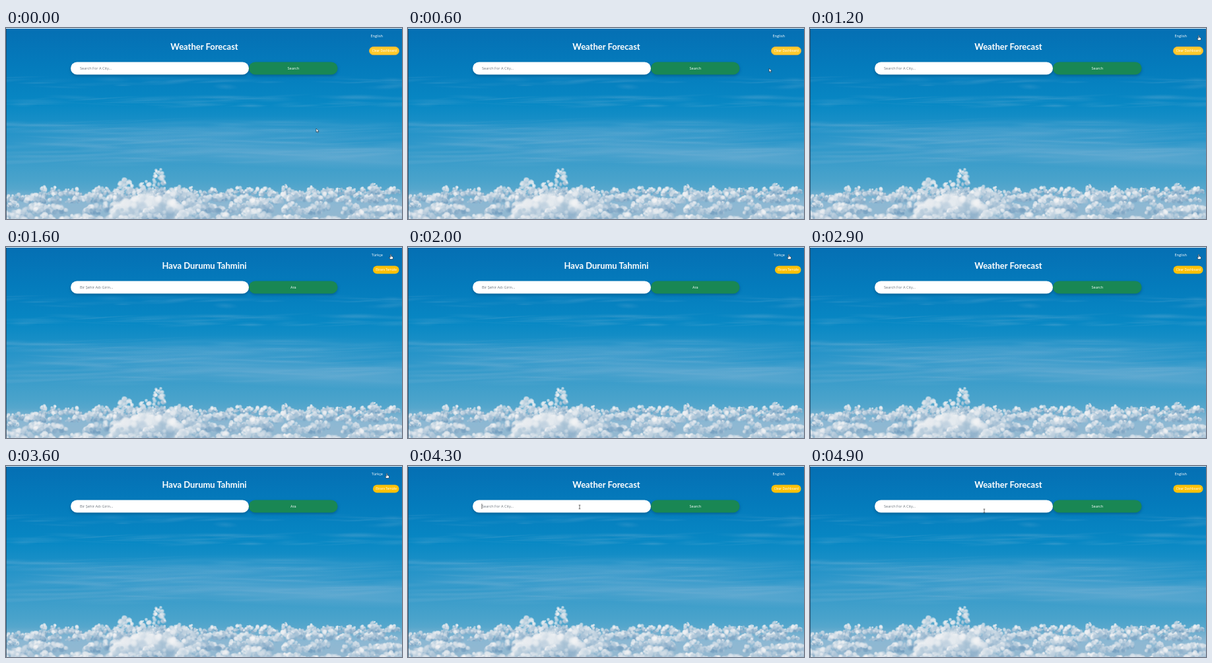
An HTML page with a canvas for the animation above (5000 ms loop, 600 px wide and 289 px high).

```html
<!DOCTYPE html>
<html lang="en">
<head>
<meta charset="utf-8">
<style>
  html, body { margin: 0; width: 100%; height: 100%; overflow: hidden; background: #0780be; }
  canvas, svg { position: absolute; left: 0; top: 0; width: 600px; height: 289px; }
  svg svg { width: 10px; height: 10.5px; }
  text { font-family: "Open Sans", "Noto Sans", sans-serif; font-size: 5.6px; fill: #fff; }
  #title { font: bold 13px Lato, sans-serif; }
  #clearText { font-size: 4.75px; }
  .mid { text-anchor: middle; }
  .shade { filter: drop-shadow(0 2px 2px rgba(0, 30, 60, .3)); }
  .pointer { fill: #fff; stroke: #123; stroke-width: .6; }
</style>
</head>
<body>
<canvas id="sky" width="600" height="289"></canvas>
<svg viewBox="0 0 600 289">
  <text id="title" class="mid" x="300.5" y="33"></text>
  <g class="shade">
    <rect x="368" y="51.5" width="134.5" height="19" rx="9.5" fill="#198754"/>
    <rect x="98" y="51.5" width="270" height="19" rx="9.5" fill="#fff"/>
  </g>
  <text id="hint" x="112" y="63" style="fill:#6c757d"></text>
  <rect id="caret" x="111.6" y="57" width=".7" height="8" fill="#333"/>
  <text id="search" class="mid" x="435.3" y="63"></text>
  <text id="lang" x="571" y="13.6" text-anchor="end"></text>

  <svg x="573" y="6.5" viewBox="0 0 10 10.5">
    <rect width="10" height="10.5" rx="1.6" fill="#1d3a70"/>
    <path d="M.6.6 9.4 9.9M9.4.6.6 9.9" stroke="#e8e8ec" stroke-width="1.6"/>
    <path d="M5 0V10.5M0 5.25H10" stroke="#e8e8ec" stroke-width="3"/>
    <path d="M5 0V10.5M0 5.25H10" stroke="#c8283c" stroke-width="1.6"/>
  </svg>
  <svg x="585.5" y="6.5" viewBox="0 0 10 10.5">
    <rect width="10" height="10.5" rx="1.6" fill="#d02028"/>
    <circle cx="4.2" cy="5.2" r="2.4" fill="#fff"/>
    <circle cx="4.9" cy="5.2" r="1.9" fill="#d02028"/>
    <circle cx="7.2" cy="5.2" r=".9" fill="#fff"/>
  </svg>

  <rect id="clear" y="28.6" height="12" rx="6" stroke="#e0b040"/>
  <text id="clearText" class="mid" y="36.4"></text>

  <g id="cursor">
    <path id="arrow" class="pointer" d="M0 0V5.6L1.3 4.5 2.2 6.5 3.2 6 2.4 4.1H4.1Z"/>
    <path id="hand" class="pointer" d="M-.7 0Q0-.9.7 0V2.6L3.6 3.5 3.1 7H-.8L-2.6 4.3-.7 4.2Z"/>
    <path id="beam" d="M-1.3-2.8H1.3M-1.3 2.8H1.3M0-2.8V2.8" stroke="#333" stroke-width=".7"/>
  </g>
  <path d="M0 .5H600" stroke="#f4f8fa"/>
  <path d="M.4 1V289" stroke="#173f5c" stroke-width=".8"/>
</svg>
<script>
const $ = id => document.getElementById(id);
const mix = (a, b, k) => a + (b - a) * k;
const clamp = k => Math.min(1, Math.max(0, k));

// Sky
const c = $('sky').getContext('2d');
let seed = 11;
const rnd = () => (seed = seed * 16807 % 2147483647) / 2147483647;

function gradient(g, colors) {
  colors.forEach((color, i) => g.addColorStop(i / (colors.length - 1), color));
  return g;
}

function streak(x, y, w, h, tilt, alpha) {
  c.save();
  c.translate(x, y);
  c.rotate(tilt);
  c.scale(w, h);
  c.fillStyle = gradient(c.createRadialGradient(0, 0, 0, 0, 0, 1),
    [`rgba(140,185,216,${alpha})`, 'rgba(140,185,216,0)']);
  c.fillRect(-1, -1, 2, 2);
  c.restore();
}

function streaks(n, top, bottom, width, alpha) {
  for (let i = 0; i < n; i++)
    streak(rnd() * 640 - 20, mix(top, bottom, rnd()), width * mix(.3, 1.3, rnd()), 1 + rnd() * 4,
      mix(-.07, .05, rnd()), alpha * mix(.4, 1.4, rnd()));
}

function puff(x, y, r, light) {
  const tone = (lo, hi) => Math.round(mix(lo, hi, light));
  const rgb = `${tone(112, 244)},${tone(156, 244)},${tone(190, 245)}`;
  c.fillStyle = gradient(c.createRadialGradient(x, y - r * .2, 0, x, y, r),
    [`rgba(${rgb},.85)`, `rgba(${rgb},.65)`, `rgba(${rgb},0)`]);
  c.fillRect(x - r, y - r, r * 2, r * 2);
}

// A dome of puffs, bright on top and blue-grey at the foot
function heap(x, foot, w, h) {
  const n = 12 + w * h / 6;
  for (let i = 0; i < n; i++) {
    const u = rnd() * 2 - 1, v = rnd();
    const y = foot - v * h * Math.sqrt(1 - u * u);
    puff(x + u * w, y, mix(2, 5, rnd()) * (.6 + w / 50), clamp(.15 + v * .75 - u * .15 + (rnd() - .5) * .5));
  }
}

function row(n, foot, w, h) {
  for (let i = 0; i < n; i++) {
    const x = (i + rnd()) * 600 / n;
    heap(x, foot + rnd() * 6 + 10 * Math.exp(-x / 40), w * mix(.6, 1.4, rnd()), h * mix(.5, 1.4, rnd()));
  }
}

function drawSky() {
  c.fillStyle = gradient(c.createLinearGradient(0, 0, 0, 289),
    ['#056fb3', '#047bbc', '#0888c4', '#2b96c9', '#4aa3cb', '#83b4d0']);
  c.fillRect(0, 0, 600, 289);
  streaks(30, 74, 90, 50, .15);
  streaks(40, 104, 118, 60, .15);
  streaks(90, 140, 180, 100, .13);
  streaks(50, 178, 207, 110, .15);
  streak(480, 192, 340, 22, .03, .45);
  streak(300, 160, 340, 26, -.02, .25);

  c.fillStyle = gradient(c.createLinearGradient(0, 244, 0, 289), ['#8db8d300', '#8db8d3', '#94b8d0']);
  c.fillRect(0, 244, 600, 45);
  row(45, 249, 8, 10);
  row(28, 259, 13, 11);
  heap(557, 252, 9, 18);
  heap(180, 272, 17, 44);
  heap(232, 268, 11, 60);
  heap(212, 272, 14, 42);
  heap(262, 268, 26, 26);
  row(18, 276, 20, 15);
  heap(215, 298, 62, 42);
  row(14, 292, 26, 17);
}

// Interface
const words = {
  en: {title: 'Weather Forecast', hint: 'Search For A City...', search: 'Search',
    lang: 'English', clearText: 'Clear Dashboard'},
  tr: {title: 'Hava Durumu Tahmini', hint: 'Bir Şehir Adı Girin...', search: 'Ara',
    lang: 'Türkçe', clearText: 'Ekranı Temizle'}
};
const ukFlag = {x: 577, y: 11.5}, trFlag = {x: 589, y: 11.5};
const moves = [
  {from: 0, to: 1000, spot: trFlag},
  {from: 1400, to: 1800, spot: ukFlag},
  {from: 2300, to: 2700, spot: trFlag},
  {from: 3100, to: 3400, spot: ukFlag},
  {from: 3700, to: 4200, spot: {x: 260, y: 62}},
  {from: 4500, to: 4700, spot: {x: 264, y: 68}}
];

function pointer(t) {
  let x = 470, y = 152;
  for (const {from, to, spot} of moves) {
    const k = clamp((t - from) / (to - from)), ease = k * k * (3 - 2 * k);
    x = mix(x, spot.x, ease);
    y = mix(y, spot.y, ease);
  }
  return [x, y];
}

const set = (id, attrs) => Object.entries(attrs).forEach(([k, v]) => $(id).setAttribute(k, v));
const show = (id, on) => set(id, {visibility: on ? 'visible' : 'hidden'});

function draw(t) {
  const turkish = t >= 1300 && t < 2200 || t >= 3000 && t < 3700;
  const text = words[turkish ? 'tr' : 'en'];
  for (const id in text) $(id).textContent = text[id];

  const focused = t < 1300, left = turkish ? 556 : 550.5, right = 595.5;
  set('clear', {x: left, width: right - left, fill: focused ? '#ffca2c' : '#ffc107',
    'stroke-width': focused ? 1 : 0});
  set('clearText', {x: (left + right) / 2 + .4});

  const [x, y] = pointer(t);
  const inRow = y > 51 && y < 71;
  const beam = inRow && x > 98 && x < 368;
  const hand = inRow && x >= 368 && x < 502 || x > 550 && y > 28 && y < 41 || x > 572 && y < 18;
  set('cursor', {transform: `translate(${x} ${y})`});
  show('beam', beam);
  show('hand', hand);
  show('arrow', !beam && !hand);
  show('caret', t >= 4200 && t < 4700);
}

function tick() {
  draw(Math.floor(performance.now() % 5000 / 100) * 100);
  requestAnimationFrame(tick);
}

drawSky();
tick();
</script>
</body>
</html>
```
